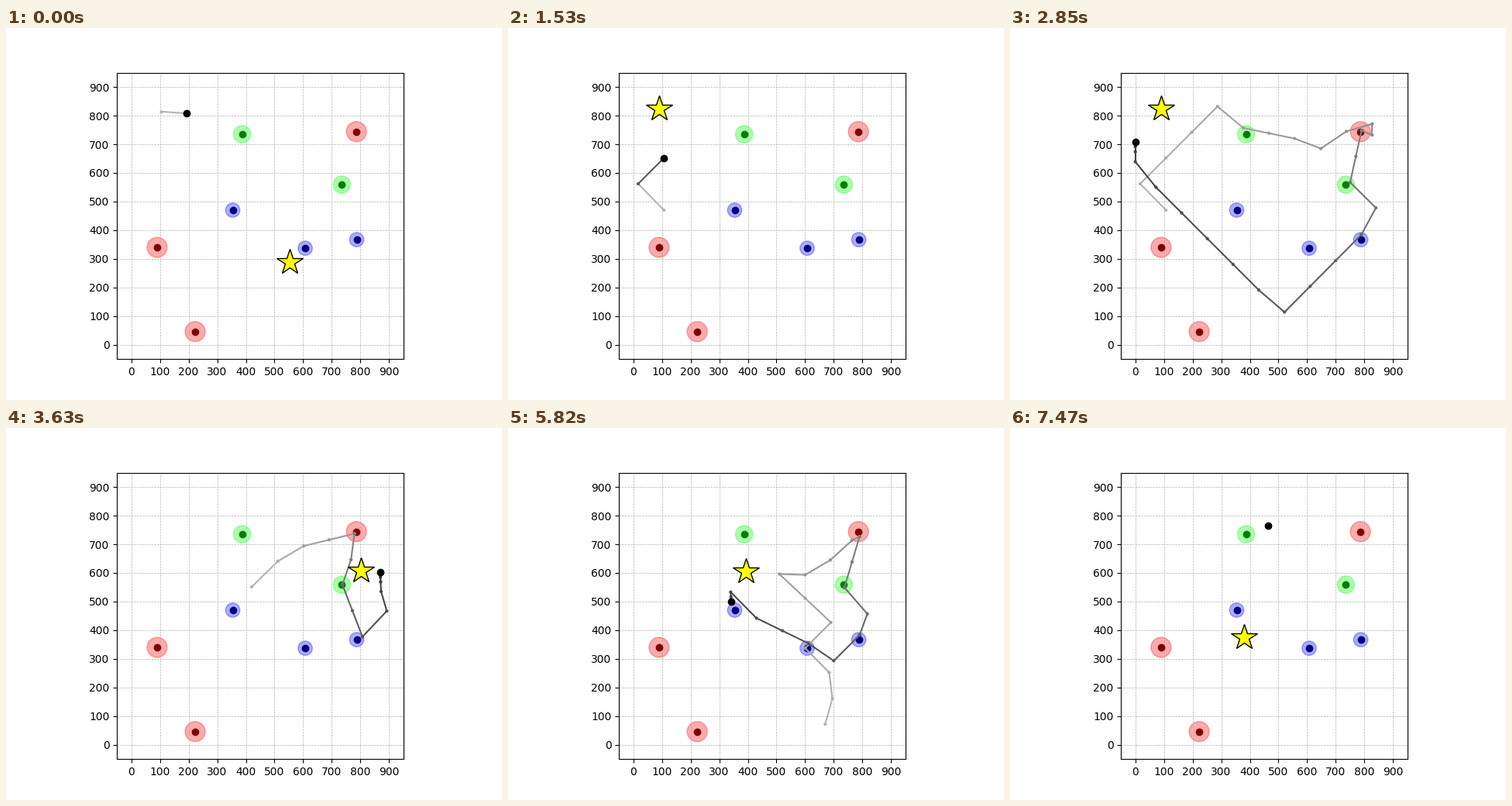
A matplotlib script that plays this animation: 640x480 px, repeating every 7500 ms.

```python
import math

import numpy as np
import matplotlib.pyplot as plt
from matplotlib.animation import FuncAnimation
from matplotlib.collections import LineCollection
from matplotlib.patches import Circle

EPISODE = 50     # frames per run
FRAMES = 250
MAX_STEP = 95    # largest move along one axis

RED, GREEN, BLUE = (1, 0, 0), (0, 1, 0), (0, 0, 1)
ZONES = [
    (RED, 35, [(90, 340), (223, 46), (786, 744)]),
    (GREEN, 30, [(387, 735), (735, 559)]),
    (BLUE, 25, [(354, 470), (607, 337), (787, 367)]),
]

# Usual tour of the zones on the right; a third value is a wait in steps
TOUR = [(790, 727, 3), (737, 549, 2), (817, 457), (790, 383, 3),
        (700, 293), (611, 354)]


def walk(stops, rest):
    """Go through the stops in equal steps, then ease into the rest point."""
    path = [np.array(stops[0], float)]
    for x, y, *wait in stops[1:]:
        start = path[-1]
        delta = (x, y) - start
        n = math.ceil(np.abs(delta).max() / MAX_STEP)
        path += [start + delta * k / n for k in range(1, n + 1)]
        path += [path[-1]] * sum(wait)
    while len(path) < EPISODE:
        path.append((path[-1] + rest) / 2)
    return np.array(path)


# (star position, agent path) for each run
RUNS = [
    ((554, 288), walk([(104, 814), (192, 808), (377, 745), (648, 685),
                       *TOUR], (598, 312))),
    ((90, 824), walk([(107, 470), (17, 562), (287, 832), (377, 757),
                      (556, 720), (648, 685), (737, 745), (827, 771),
                      (827, 732), (790, 748, 1), (750, 567, 1), (840, 478),
                      (789, 384, 2), (521, 114), (431, 191), (72, 550),
                      (0, 639)], (0, 709))),
    ((801, 608), walk([(420, 551), (512, 641), (602, 694), (779, 737, 2),
                       (767, 646), (737, 559, 1), (807, 377, 1),
                       (892, 467), (872, 535)], (869, 602))),
    ((394, 606), walk([(670, 72), (695, 161), (684, 252), (600, 337),
                       (690, 427), (510, 596), (600, 593), (688, 645),
                       (763, 713), *TOUR, (430, 442), (340, 533)],
                      (342, 500))),
    ((280, 560), walk([(826, 640), *TOUR, (430, 442)], (312, 522))),
    ((380, 374), walk([(463, 765)], (380, 374))),
]

fig, ax = plt.subplots(figsize=(6.4, 4.8), dpi=100)
ax.set_aspect("equal")
ax.set(xlim=(-50, 950), ylim=(-50, 950))
ax.set_xticks(range(0, 1000, 100))
ax.set_yticks(range(0, 1000, 100))
ax.grid(linestyle="--", linewidth=0.5)

for color, radius, centers in ZONES:
    dark = tuple(c / 2 for c in color)
    for center in centers:
        ax.add_patch(Circle(center, radius, color=color, alpha=0.33))
        ax.plot(*center, "o", color=dark)

trail = LineCollection([], linewidths=1.5, capstyle="projecting", zorder=2.1)
ax.add_collection(trail, autolim=False)
joints = ax.scatter([], [], s=4, linewidths=1, zorder=2.2)
head, = ax.plot([], [], "o", color="black", zorder=2.3)
star, = ax.plot([], [], "*", ms=25, mfc="yellow", mec="black", zorder=3)


def update(frame):
    run, step = divmod(frame + 1, EPISODE)
    goal, path = RUNS[run]
    pts = path[:step + 1]
    shades = [str(0.7 * (1 - i / step)) for i in range(step)]
    trail.set_segments([pts[i:i + 2] for i in range(step)])
    trail.set_color(shades)
    joints.set_offsets(pts[:-1])
    joints.set_color(shades)
    head.set_data(pts[-1:, 0], pts[-1:, 1])
    star.set_data([goal[0]], [goal[1]])
    return trail, joints, head, star


anim = FuncAnimation(fig, update, frames=FRAMES, interval=30,
                     repeat=True, repeat_delay=0)
plt.show()
```
